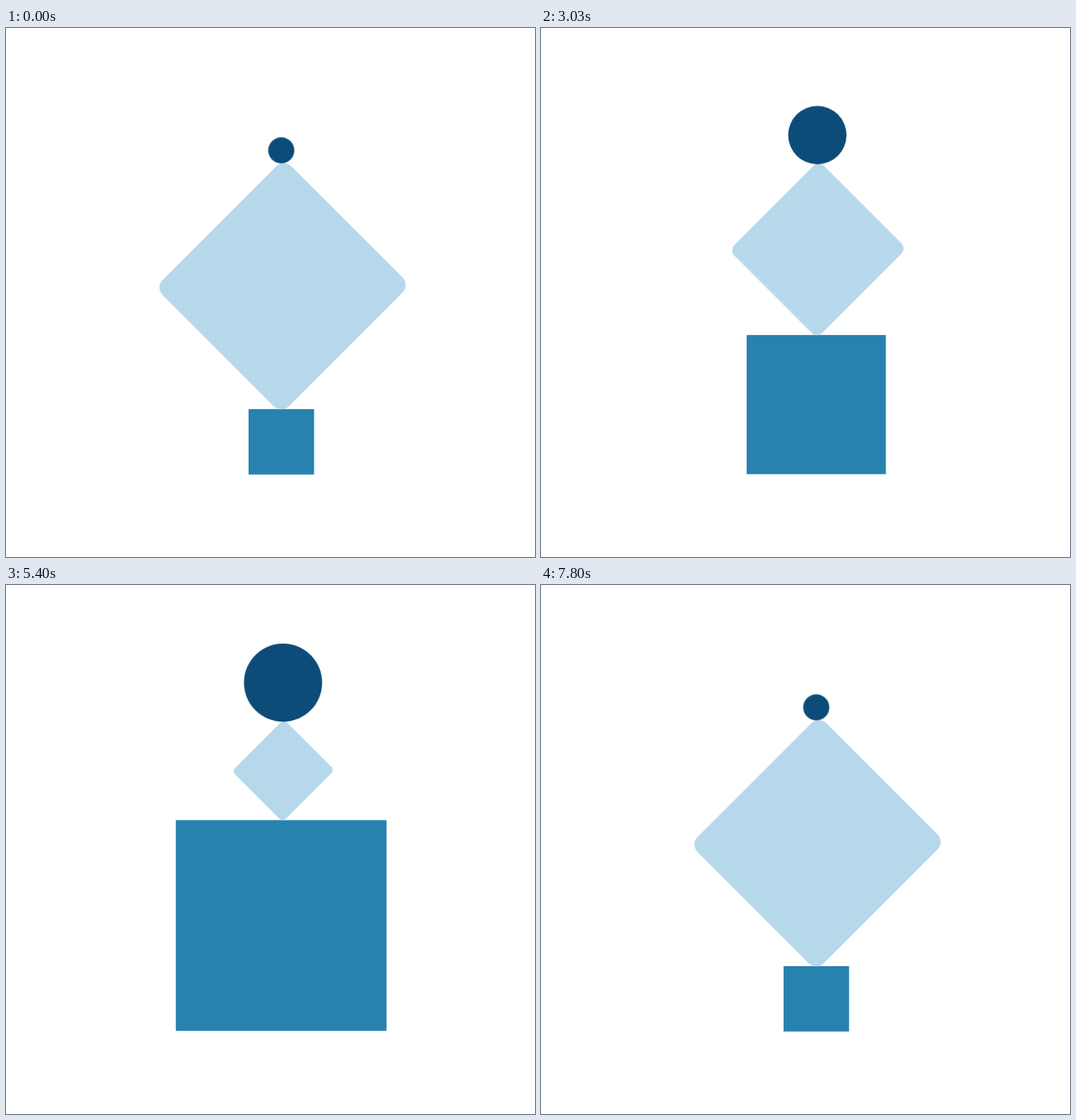
Recreate the animation shown at these times as an HTML page. Size 748 px wide and 748 px high, loop 8.03 s.

```html
<!DOCTYPE html>
<html lang="en">
<head>
<meta charset="utf-8">
<title>Balancing shapes</title>
<style>
  html, body { margin: 0; width: 100%; height: 100%; overflow: hidden; background: #fff; }
  svg { display: block; width: 100%; height: 100%; }
</style>
</head>
<body>
<svg viewBox="0 0 748 748">
  <rect id="box" x="-149" y="-149" width="298" height="298" rx="1" fill="#2782b0"/>
  <rect id="diamond" x="-126.2" y="-128.7" width="252.4" height="257.4" rx="15" fill="#b5d8ea"/>
  <circle id="ball" r="55.3" fill="#0d4c78"/>
</svg>
<script>
  const LOOP = 8030;
  const PASSES = [0, 4025];
  const OUT = [365, 1397];
  const BACK = [2475, 3765];
  const CUBIC = 'cubic-bezier(.65, 0, .35, 1)';
  const EARLY = 'cubic-bezier(.2, 0, .63, 1)';

  // Poses are [centre x, centre y, scale]; each part goes rest -> lift -> rest.
  const parts = [
    { id: 'box', rest: [389.3, 585.2, 0.3108], lift: [389.1, 481.4, 1], back: EARLY },
    { id: 'diamond', rest: [391, 365.2, 1], lift: [392, 262.4, 0.402], turn: 45, back: EARLY },
    { id: 'ball', rest: [389.2, 173, 0.3345], lift: [391.7, 138, 1], back: 'ease-in-out' }
  ];

  function animatePart({ id, rest, lift, turn = 0, back }) {
    const key = (time, [x, y, k], easing = 'linear') => ({
      offset: time / LOOP,
      transform: `translate(${x}px, ${y}px) rotate(${turn}deg) scale(${k})`,
      easing
    });
    const steps = PASSES.flatMap(start => [
      key(start + OUT[0], rest, CUBIC),
      key(start + OUT[1], lift),
      key(start + BACK[0], lift, back),
      key(start + BACK[1], rest)
    ]);
    document.getElementById(id).animate(
      [key(0, rest), ...steps, key(LOOP, rest)],
      { duration: LOOP, iterations: Infinity }
    );
  }

  parts.forEach(animatePart);
</script>
</body>
</html>
```
